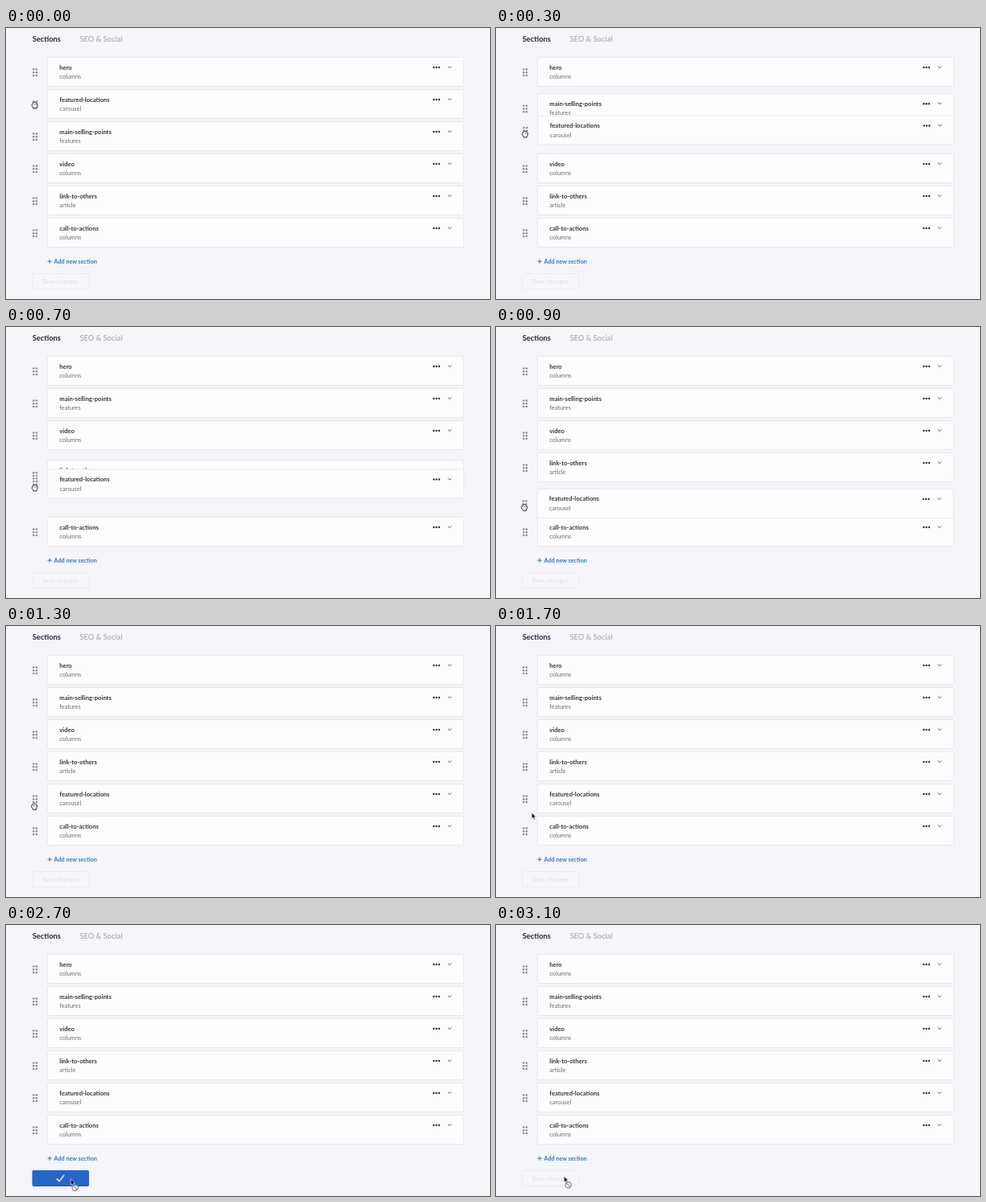
These frames come from a looping animation (600 px wide and 337 px high, 3.2 s). An HTML page:

```html
<!DOCTYPE html>
<html lang="en">
<head>
<meta charset="utf-8">
<title>Reorder sections</title>
<style>
html, body { margin: 0; width: 100%; height: 100%; overflow: hidden; background: #f6f5fa; }
svg { display: block; width: 600px; height: 337px; font-family: Lato, "Open Sans", sans-serif; }
.card { fill: #fefdfe; stroke: #e9e7ee; }
.title { font-size: 7.6px; font-weight: 700; fill: #343338; }
.kind { font-size: 7.4px; fill: #6b6a70; }
.tab { font-size: 9.3px; }
.grip { fill: #8b8a90; }
.more { fill: #343338; }
.line { fill: none; stroke-linecap: round; stroke-linejoin: round; }
.hand { fill: #fff; stroke: #17171a; stroke-width: .9; stroke-linejoin: round; }
</style>
</head>
<body>
<svg viewBox="0 0 600 337">
  <text class="tab" x="32.7" y="16.8" font-weight="700" fill="#28283f">Sections</text>
  <text class="tab" x="91.5" y="16.8" fill="#a09fa6">SEO &amp; Social</text>
  <g id="rows"></g>
  <path class="line" d="M51.8 290.2h4.6M54.1 287.9v4.6" stroke="#2f78d0"/>
  <text x="59.6" y="292.6" font-size="7.2" font-weight="700" fill="#2f78d0">Add new section</text>
  <rect x="33" y="305.5" width="69.5" height="19" rx="1" fill="#f7f6fa" stroke="#ecebf0"/>
  <text class="title" x="67.5" y="317.6" text-anchor="middle" style="fill:#e3e2e8">Save changes</text>
  <g id="button">
    <rect x="32.7" y="305" width="70" height="20" rx="1.5" fill="#1d50a4"/>
    <rect x="32.7" y="305" width="70" height="19" rx="1.5" fill="#2566c9"/>
    <text id="label" class="title" x="67.5" y="317.6" text-anchor="middle" style="fill:#fff">Save changes</text>
    <path id="spinner" class="line" d="M67.5 311a4 4 0 1 1-4 4" stroke="#dfe8f7" stroke-width="1.3"/>
    <path id="check" class="line" d="M63.2 315.8l2.8 2.9 5.8-7.4" stroke="#d5e1f4" stroke-width="1.7"/>
  </g>
  <g id="cursor">
    <g id="grab" class="hand">
      <path d="M-2.8-.8Q-3.4-2.6-2.1-2.6Q-1.7-4-.7-3.3Q.3-4.3 1.2-3.2Q2.4-3.6 2.6-2.3Q3.8-2.2 3.5-.3Q3.6 1.4 2.5 2.6V3.9H-1.7V2.8Q-4.2.5-3.5-.4Z"/>
      <path d="M-.9-1.8v1.3M.6-1.8v1.3M2-1.6v1.1" stroke-width=".6"/>
    </g>
    <g id="point" class="hand">
      <path d="M-.9.6Q0-.6.9.6V3Q2 2.4 2.4 3.3Q3.5 2.9 3.8 3.9Q5 3.9 4.7 5.6Q4.6 6.8 3.9 8.2H-.1Q-1.2 6.6-2.4 5.2Q-2.2 4-.9 5Z"/>
      <path d="M1 5.2v1.6M2.2 5.2v1.6M3.3 5.2v1.6" stroke-width=".5"/>
    </g>
    <g id="arrow">
      <path d="M0 0V7.7L1.7 6.1L2.9 8.8L4.2 8.2L3 5.6H5.4Z" fill="#111" stroke="#fff" stroke-width=".6"/>
    </g>
    <g id="ban" fill="none">
      <circle cx="5.3" cy="11" r="3.6" fill="#fff" fill-opacity=".7" stroke="#85858d" stroke-width="1.2"/>
      <path d="M2.9 8.5l4.9 5" stroke="#85858d" stroke-width="1.1"/>
    </g>
  </g>
</svg>
<script>
const STEP = 100, LOOP = 3200, PITCH = 40, DROP = 1000;
const $ = id => document.getElementById(id);

// name, kind, time at which the row makes way for the dragged one
const sections = [
  ["hero", "columns"],
  ["main-selling-points", "features", 220],
  ["video", "columns", 420],
  ["link-to-others", "article", 640],
  ["call-to-actions", "columns"],
  ["featured-locations", "carousel"]
];
const slots = [0, 2, 3, 4, 5, 1];

// time, x, y of the pointer
const path = [
  [0, 35.5, 96], [100, 35.5, 99], [200, 35.7, 113], [300, 35.9, 132], [400, 36.1, 152],
  [500, 36.2, 169.2], [700, 35.6, 200], [800, 35.2, 215], [900, 35, 224.4], [1500, 35, 224.4],
  [1600, 38, 226], [1700, 44.3, 232], [1800, 54, 256], [1900, 65, 287], [2000, 73, 310],
  [2100, 75.3, 318], [2200, 75.3, 318], [2700, 80.3, 315.7], [3100, 84.3, 312.3], [3200, 84.3, 312.3]
];

const clamp = v => Math.max(0, Math.min(1, v));
const easeOut = v => 1 - (1 - clamp(v)) ** 4;
const show = (id, on) => $(id).style.display = on ? "" : "none";
const move = (el, x, y) => el.setAttribute("transform", `translate(${x} ${y})`);

function dots(name, xs, ys, r) {
  return xs.map(x => ys.map(y => `<circle class="${name}" cx="${x}" cy="${y}" r="${r}"/>`).join("")).join("");
}

$("rows").innerHTML = sections.map(([name, kind]) => `<g>
  <rect class="card" x="51.5" y="36.5" width="516" height="36" rx="1"/>
  <text class="title" x="66.3" y="51.6">${name}</text>
  <text class="kind" x="66.3" y="63.2">${kind}</text>
  ${dots("grip", [34.2, 37.9], [51.6, 55.3, 59], 1.25)}
  ${dots("more", [530.3, 533.6, 536.9], [49], 1.2)}
  <path class="line" d="M548.1 47.8l1.9 1.9 1.9-1.9" stroke="#55545a"/>
</g>`).join("");
const rows = [...$("rows").children];

function pointer(t) {
  const i = path.findIndex(p => p[0] > t);
  const a = path[i - 1], b = path[i], k = (t - a[0]) / (b[0] - a[0]);
  return [a[1] + (b[1] - a[1]) * k, a[2] + (b[2] - a[2]) * k];
}

function draw(t) {
  const [x, y] = pointer(t);

  sections.forEach(([, , start], i) => {
    const shift = start ? easeOut((t - start) / 200) : 0;
    move(rows[i], 0, PITCH * (slots[i] - shift));
  });
  const [hx, hy] = pointer(Math.min(t, DROP));
  const settle = easeOut((t - DROP + STEP) / 400);
  const dx = hx - 35.5, dy = Math.max(0, hy - 99.5);
  move(rows[5], dx * (1 - settle), PITCH + dy + (3 * PITCH - dy) * settle);

  $("button").style.opacity = clamp((t - 1700) / 200) * clamp((3100 - t) / 300);
  show("label", t < 2400);
  show("spinner", t >= 2400 && t < 2600);
  show("check", t >= 2600);
  $("spinner").setAttribute("transform", `rotate(${t * .6} 67.5 315)`);

  const busy = t >= 2400;
  const pointing = t >= 2000 && !busy;
  move($("cursor"), x, y);
  show("grab", t < 1600);
  show("point", pointing);
  show("arrow", t >= 1600 && !pointing);
  show("ban", busy);
}

const begin = performance.now();
function tick() {
  const t = (performance.now() - begin) % LOOP;
  draw(Math.floor(t / STEP) * STEP);
  requestAnimationFrame(tick);
}
tick();
</script>
</body>
</html>
```
